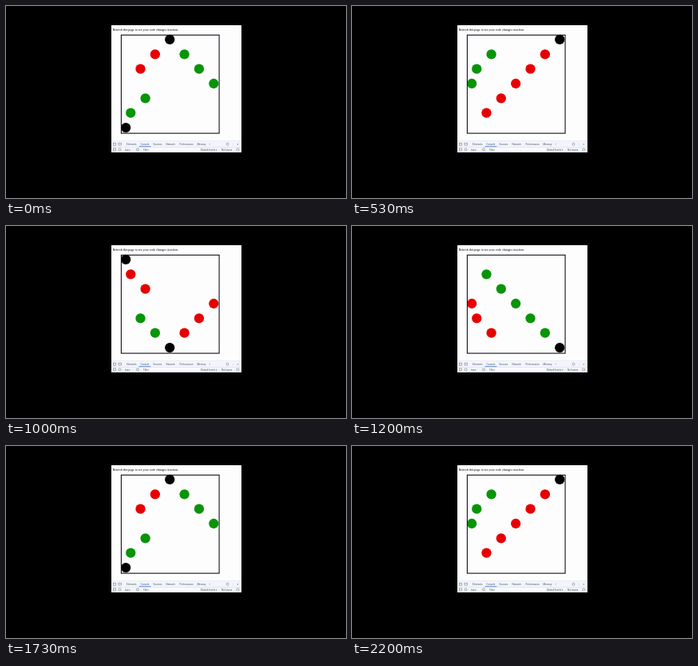
An HTML page with a canvas for the animation above (2.27 s loop, 426x240 px).

```html
<!DOCTYPE html>
<html lang="en">
<head>
<meta charset="utf-8">
<title>Bouncing ball</title>
<style>
  html, body { margin: 0; width: 100%; height: 100%; overflow: hidden; background: #000; }
  canvas { display: block; width: 426px; height: 240px; }
</style>
</head>
<body>
<canvas id="stage" width="426" height="240"></canvas>
<script>
const ctx = document.getElementById('stage').getContext('2d');
const LOOP = 2270;

// Each time the pattern slips, its vertical phase (12 steps per bounce) moves on by 3.
const SLIPS = [200, 930, 1070, 1670, 2200];
const FIRST_PHASE = 6;
const TRAIL_X = [20, 40, 100, 380, 320, 260, 200, 140, 80];

function label(text, x, y, font = '3px Roboto, sans-serif', color = '#55585e') {
  ctx.font = font;
  ctx.fillStyle = color;
  ctx.fillText(text, x, y);
}

function rect(x, y, w, h, color) {
  ctx.fillStyle = color;
  ctx.fillRect(x, y, w, h);
}

function disc(x, y, r, color) {
  ctx.fillStyle = color;
  ctx.beginPath();
  ctx.arc(x, y, r, 0, Math.PI * 2);
  ctx.fill();
}

function ring(x, y, r) {
  ctx.beginPath();
  ctx.arc(x, y, r, 0, Math.PI * 2);
  ctx.stroke();
}

function drawToolbar() {
  rect(132, 168.5, 163, 14.5, '#f2f5fc');
  rect(132, 168.3, 163, 0.5, '#dbe1ec');
  rect(132, 176, 163, 0.5, '#cfd8ea');
  rect(166.5, 175.2, 15, 0.9, '#5a87dd');
  rect(170, 177.2, 73, 5, '#f8faff');

  [['Elements', 151], ['Console', 168.5], ['Sources', 184.5], ['Network', 200.5],
   ['Performance', 217.5], ['Memory', 239.5], ['»', 254.5]]
    .forEach(([text, x]) => label(text, x, 173.8));
  [['top ▾', 149], ['Filter', 172], ['Default levels ▾', 244], ['No Issues', 270]]
    .forEach(([text, x]) => label(text, x, 180.7));

  ctx.strokeStyle = '#777b83';
  ctx.lineWidth = 0.6;
  ctx.strokeRect(134.6, 171.2, 3, 3);
  ctx.strokeRect(141, 171.2, 3.6, 2.8);
  ctx.strokeRect(134.6, 178, 3, 3);
  ring(142.5, 179.5, 1.6);
  ring(165, 179.5, 1.5);
  ring(277.5, 172.7, 1.5);
  ring(290.3, 179.5, 1.6);
  label('⋮', 283, 173.9);
  label('×', 289.3, 174, '4px Roboto, sans-serif');
}

function drawTrail(phase) {
  TRAIL_X.forEach((x, i) => {
    const step = (phase + i) % 12;
    const y = 20 + 60 * (step <= 6 ? step : 12 - step);
    const color = step % 6 === 0 ? '#000' : step < 6 ? '#e50000' : '#089408';
    disc(144 + x * 0.306, 35.8 + y * 0.306, 6.15, color);
  });
}

function draw() {
  const time = performance.now() % LOOP;
  const slips = SLIPS.filter(start => time >= start).length;
  rect(0, 0, 426, 240, '#000');
  rect(132, 24, 163, 159, '#fdfdfd');
  label('Refresh this page to see your code changes in action.', 133.7, 30.8,
        '3.9px "Liberation Serif", serif', '#000');
  drawToolbar();
  drawTrail(FIRST_PHASE + 3 * slips);
  ctx.strokeStyle = '#101020';
  ctx.lineWidth = 1.1;
  ctx.strokeRect(144.4, 36.3, 122.7, 122.8);
  requestAnimationFrame(draw);
}

draw();
</script>
</body>
</html>
```
